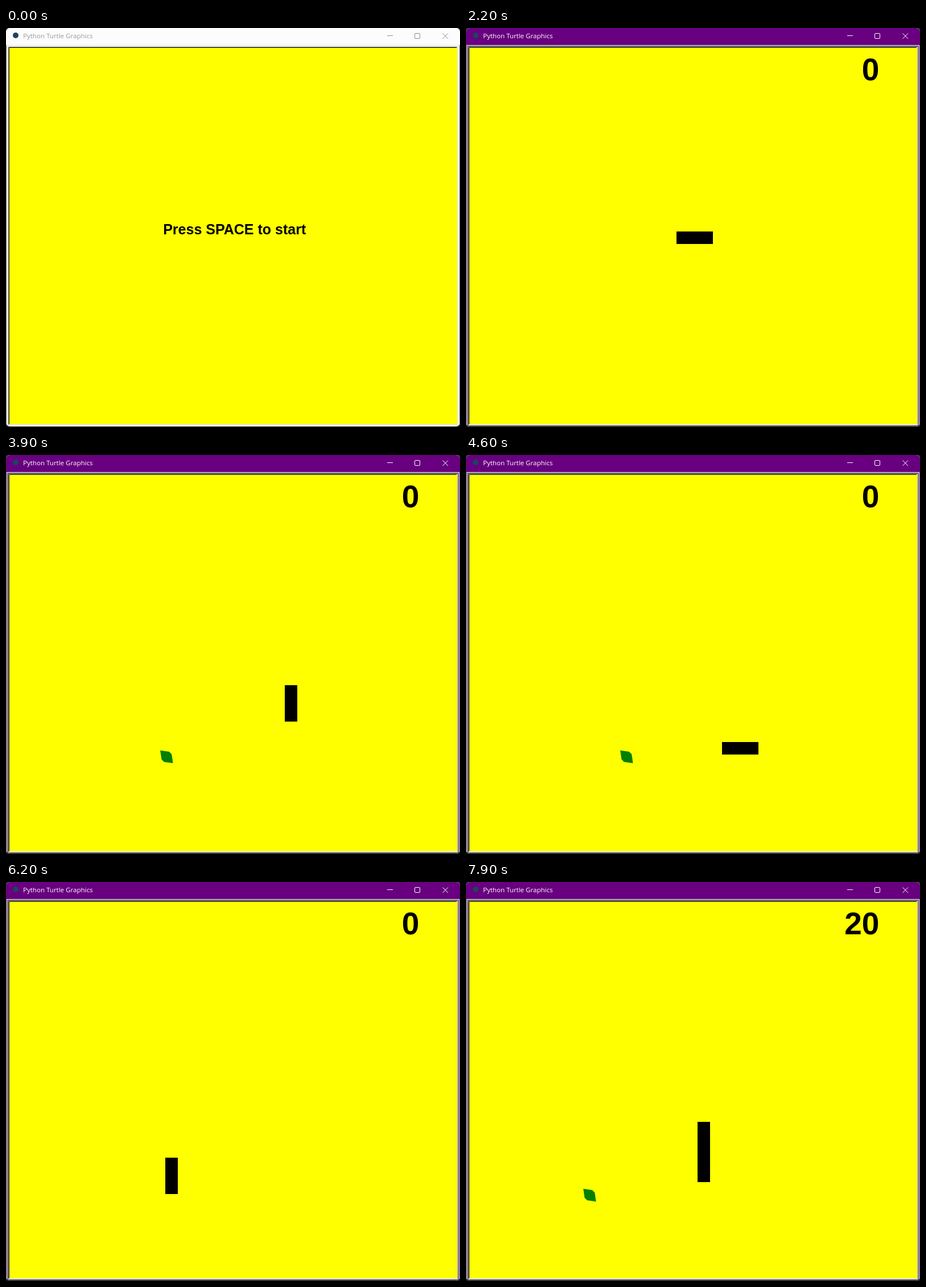
Write an HTML page that moves like this. It is 798 px wide and 702 px high and loops after 8000 ms.

```html
<!DOCTYPE html>
<html lang="en">
<head>
<meta charset="utf-8">
<title>Python Turtle Graphics</title>
<style>
  html, body { margin: 0; width: 100%; height: 100%; overflow: hidden; background: #1c1c1c; }
  svg { display: block; width: 798px; height: 702px; }
  text { font-kerning: none; }
  .title { font: 11.55px "Open Sans", "Noto Sans", sans-serif; }
  .prompt { font: bold 25px "Liberation Sans", Arial, sans-serif; text-anchor: middle; }
  .score { font: bold 55px "Liberation Sans", Arial, sans-serif; text-anchor: end; }
  .idle { fill: #999; stroke: #8c8c8c; }
  .focus { fill: #fff; stroke: #fff; }
  .title { stroke: none; }
  .icons { fill: none; }
</style>
</head>
<body>
<svg viewBox="0 0 798 702">
  <defs>
    <clipPath id="round"><rect width="798" height="701" rx="7"/></clipPath>
    <g id="caption">
      <text class="title" x="30" y="18">Python Turtle Graphics</text>
      <g class="icons">
        <path d="M670 13.5h10M767.5 9.5l9.5 9.5M777 9.5l-9.5 9.5"/>
        <rect x="718.5" y="9.5" width="9" height="9" rx="1.5"/>
      </g>
    </g>
  </defs>

  <g clip-path="url(#round)">
    <rect width="798" height="702" fill="#f6f6f6"/>
    <rect width="798" height="30" fill="#fcfcfc"/>
    <path d="M0 30.5h798" stroke="#e4e4e4"/>
    <path d="M0.5 30v672M797.5 30v672" stroke="#777"/>
    <use href="#caption" class="idle"/>

    <g id="active" opacity="0">
      <rect width="798" height="30" fill="#68007f"/>
      <rect x="0.5" y="-9" width="797" height="709.5" fill="none" stroke="#68007f"/>
      <rect x="1.5" y="30.5" width="795" height="670" fill="none" stroke="#ededed"/>
      <rect x="3" y="32" width="792" height="668" fill="none" stroke="#646464" stroke-width="2"/>
      <use href="#caption" class="focus"/>
    </g>
    <circle cx="17" cy="13" r="5" fill="#1f4260"/>

    <!-- sunken canvas border -->
    <rect x="4" y="33" width="790" height="666" fill="#e8e8e0"/>
    <path d="M4.5 698V33.5H793" fill="none" stroke="#6a6a6a"/>
    <path d="M5.5 697V34.5H792" fill="none" stroke="#2a2a1c"/>
    <rect x="6" y="35" width="787" height="662" fill="#ff0"/>
  </g>

  <text id="prompt" class="prompt" x="401.7" y="363">Press SPACE to start</text>
  <text id="score" class="score" x="726.4" y="92"></text>
  <path id="leaf" d="M0 0L2 14L6 18L20 20L18 6L14 2Z" fill="#008000" stroke="#008000" stroke-width="2"/>
  <rect id="body"/>
</svg>
<script>
const TICK = 100, LOOP = 8000, UNIT = 21, THICK = 22;
const $ = id => document.getElementById(id);

// tick, x, y of the caterpillar's centre; it crawls evenly between neighbours
const path = [
  [21, 402, 369], [26, 402, 369], [27, 407, 369], [33, 497, 369],
  [34, 501, 378], [35, 501, 392], [37, 501, 422], [38, 501, 422], [44, 501, 509],
  [45, 497, 516], [46, 482, 516], [48, 454, 516], [49, 454, 516],
  [55, 370, 516], [58, 326, 516], [60, 299, 516], [61, 299, 516],
  [62, 291, 516.5], [64, 291, 516.5], [65, 291, 523],
  [66, 302.5, 529], [70, 390.5, 529], [71, 412.5, 529],
  [72, 418, 515], [73, 418, 495], [74, 418, 491], [77, 418, 491],
  [78, 418, 486], [79, 418, 475]
];
const turns = [34, 45, 62, 66, 72];   // alternates level and upright
const meals = [65, 78];               // each adds one unit and ten points
const leaves = [[27, 62, 272.3, 521], [65, 74, 420.5, 473.5], [78, 80, 207.4, 541]];

const passed = (list, n) => list.filter(t => n >= t).length;
const show = (el, on) => el.setAttribute('visibility', on ? 'visible' : 'hidden');
const set = (el, attrs) => { for (const k in attrs) el.setAttribute(k, attrs[k]); };

function place(n) {
  const i = path.findIndex(p => p[0] >= n);
  const b = path[i], a = path[i - 1] || b;
  const k = a === b ? 0 : (n - a[0]) / (b[0] - a[0]);
  return [a[1] + (b[1] - a[1]) * k, a[2] + (b[2] - a[2]) * k];
}

function draw(n) {
  const fade = Math.min(1, Math.max(0, (n - 1) / 6));
  $('active').setAttribute('opacity', 1 - (1 - fade) ** 2);
  show($('prompt'), n < 21);

  const eaten = passed(meals, n);
  show($('score'), n >= 22);
  $('score').textContent = eaten * 10;

  const leaf = leaves.find(l => n >= l[0] && n < l[1]);
  show($('leaf'), leaf);
  if (leaf) set($('leaf'), { transform: `translate(${leaf[2]} ${leaf[3]})` });

  show($('body'), n >= 21);
  if (n < 21) return;
  const [x, y] = place(n), long = UNIT * (3 + eaten) + 1;
  const [w, h] = passed(turns, n) % 2 ? [THICK, long] : [long, THICK];
  set($('body'), { x: Math.round(x - w / 2), y: Math.round(y - h / 2), width: w, height: h });
}

const start = performance.now();
function frame() {
  draw(Math.floor((performance.now() - start) % LOOP / TICK));
  requestAnimationFrame(frame);
}
frame();
</script>
</body>
</html>
```
